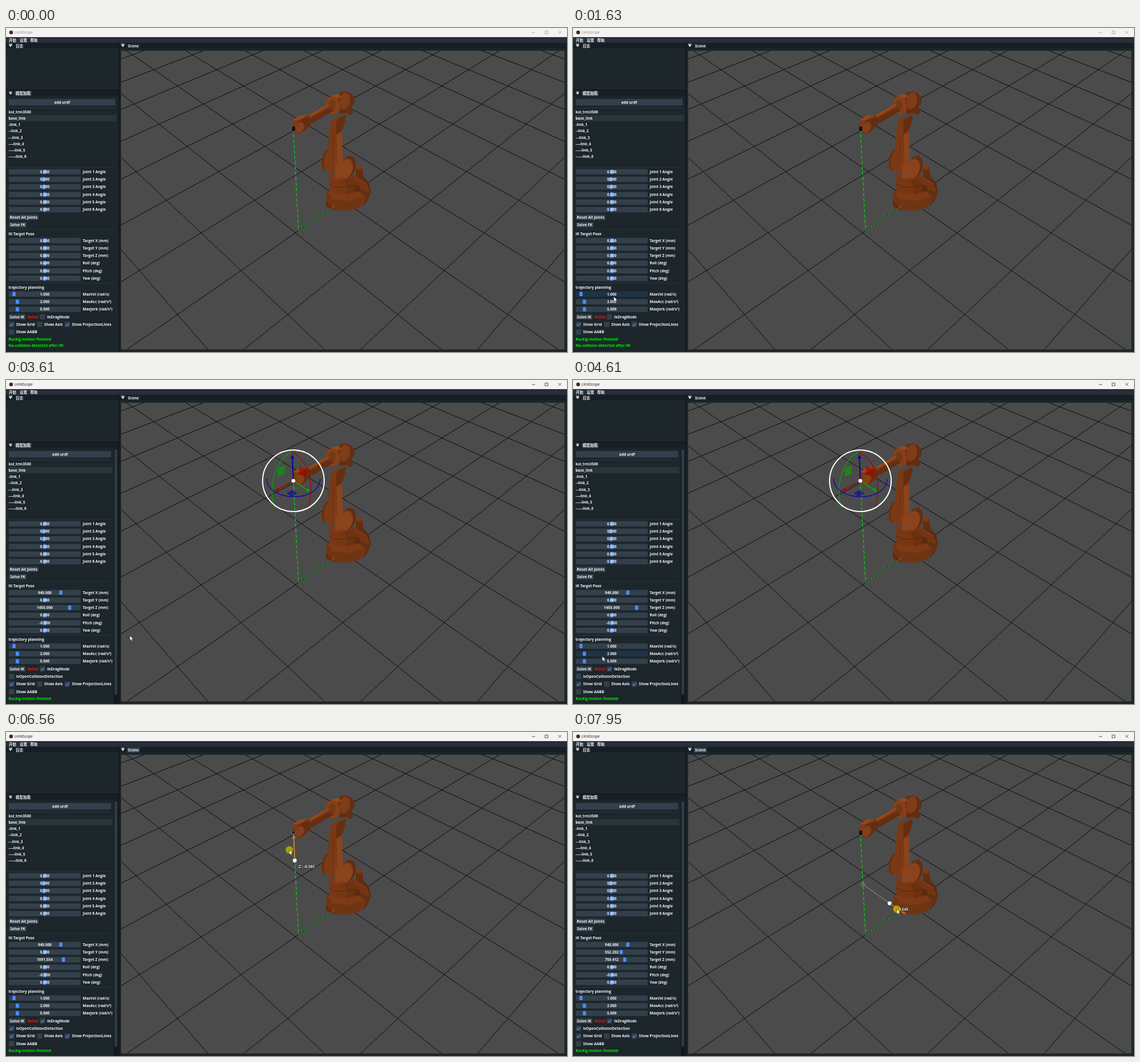
An HTML page for the animation above (8 s loop, 984 by 569 pixels).

```html
<!DOCTYPE html>
<html lang="zh">
<head>
<meta charset="utf-8">
<title>LimbScope</title>
<style>
html, body { margin: 0; width: 100%; height: 100%; overflow: hidden; background: #1c262b; }
svg { display: block; width: 984px; height: 569px; }
text { font: 700 6.5px "Open Sans", "Noto Sans CJK SC", "Noto Sans CJK", sans-serif; fill: #f2f5fa; white-space: pre; }
.title text { font-weight: 400; font-size: 6.2px; fill: inherit; }
</style>
</head>
<body>
<svg viewBox="0 0 984 569">
  <defs><clipPath id="view"><rect x="202" y="40" width="777.5" height="524.5"/></clipPath></defs>
  <rect width="984" height="569" fill="#1c262b"/>
  <rect x="202" y="40" width="777.5" height="524.5" fill="#4b4b4b"/>
  <g clip-path="url(#view)" fill="none">
    <path id="grid" stroke="#0b0b0b" stroke-width="1"/>
    <path id="drop" stroke="#00e800" stroke-width="1.1" stroke-dasharray="6 3.4"/>
    <path id="floor" stroke="#00d800" stroke-width="1.1" stroke-dasharray="3 2.4"/>
  </g>
  <g id="robot">
    <g fill="#5c2a10">
      <polygon points="613,262 626,260 637,272 640,289 634,303 628,311 605,318 600,290"/>
      <polygon points="617,268 633,275 639,289 622,283" fill="#773715"/>
      <polygon points="622,283 639,289 632,302 618,296" fill="#662f12"/>
      <polygon points="562,289 572,283 612,286 632,297 629,309 618,316 598,321 572,319 561,311" fill="#6f3413"/>
      <polygon points="561,303 566,311 572,309 578,314 577,320 571,319 562,313"/>
      <polygon points="564,289 573,284 600,292 619,287 629,296 600,304 574,301" fill="#7c3a16"/>
      <ellipse cx="574" cy="314" rx="4" ry="4.5" fill="#7c3a16"/>
    </g>
    <g fill="#6a3112">
      <path d="M566 261 611 257 614 281Q604 291 590 292 576 292 567 285Z" fill="#773715"/>
      <path d="M594 266 612 262 614 281Q607 289 598 291Z"/>
      <path d="M567 274Q584 286 613 275" fill="none" stroke="#552509" stroke-width=".8"/>
      <ellipse cx="562" cy="232" rx="8" ry="19" transform="rotate(8 562 232)"/>
      <ellipse cx="566" cy="233" rx="8" ry="18" transform="rotate(8 566 233)" fill="#7c3a16"/>
      <polygon points="568,178 579,186 580,246 570,265 563,230" fill="#7a3815"/>
      <polygon points="579,186 589,181 591,226 588,266 577,264" fill="#8a431b"/>
      <path d="M579 186 580 240M574 189 573 224" stroke="#5c2a10" stroke-width=".7" fill="none"/>
    </g>
    <g fill="#632e11">
      <path d="M614 246V266L627 268 625 245Z"/>
      <ellipse cx="619.5" cy="244.5" rx="5.8" ry="4.5" fill="#7c3a16"/>
      <path d="M610 266 630 279" stroke="#713414" stroke-width="10" stroke-linecap="round"/>
      <path d="M612 262 632 274" stroke="#86411a" stroke-width="2"/>
      <ellipse cx="601" cy="244" rx="12" ry="20" transform="rotate(14 601 244)"/>
      <ellipse cx="597" cy="247" rx="11" ry="17.5" transform="rotate(14 597 247)" fill="#8a431b"/>
      <path d="M594 226 607 221 613 232 609 242Z" fill="#76371510"/>
    </g>
    <g fill="#632e11">
      <polygon points="571,161 596,151 594,166 588,182 579,187 568,178" fill="#7a3815"/>
      <polygon points="580,161 596,152 594,166 588,182 579,187"/>
      <path d="M586 113Q593 110 602 113 612 118 611 132L606 139 609 148 605 153 597 149 586 152 580 130Z"/>
      <ellipse cx="594" cy="128" rx="9.5" ry="15" transform="rotate(10 594 128)" fill="#7f3c17"/>
      <polygon points="561,126 570,119 582,121 586,143 577,153 566,149" fill="#85401a"/>
      <polygon points="570,119 580,116 589,120 582,123" fill="#94491f"/>
      <ellipse cx="571" cy="137" rx="7" ry="11" transform="rotate(12 571 137)" fill="#743614"/>
      <polygon points="531,153 566,133 573,146 538,167" fill="#7c3a16"/>
      <polygon points="533,159 569,139 573,146 538,167"/>
      <polygon points="531,153 566,133 567,136 533,156" fill="#94491f"/>
      <polygon points="503,162 514,154 529,152 537,158 535,169 521,183 510,186 504,177" fill="#7c3a16"/>
      <polygon points="512,164 530,156 537,160 535,169 521,183 512,185"/>
      <ellipse cx="516" cy="174" rx="6.5" ry="9.5" transform="rotate(15 516 174)" fill="#84401a"/>
      <polygon points="503,162 514,154 529,152 513,162" fill="#94491f"/>
      <ellipse cx="504.5" cy="177" rx="2.8" ry="4.2" fill="#101010"/>
    </g>
  </g>
  <g id="gizmo"></g>
  <g id="frame"></g>
  <g id="panel"></g>
  <g id="pointer"></g>
</svg>
<script>
const $ = id => document.getElementById(id);
const LOOP = 8000, STEP = 65.8, FIRST = 250;
const PRESS_BOX = 3020, DRAG_ON = 3085, COLLIDE_ON = 4985;
const Z_DOWN = 6100, Z_UP = 6890, Y_DOWN = 7436;
const FRAME = "#333f4a", HOVER = "#1f3347", GRAB = "#478fff", BG = "#1c262b", BAR = "#171f24";
const REACH = 0.94;

// [time, x, y] of the pointer tip
const POINTER = [
  [250, 908, 562], [580, 225, 472], [714, 225, 472], [974, 83, 444], [1240, 80, 447], [1579, 72, 469],
  [2290, 67, 505], [3420, 67, 505], [3880, 439, 366], [3960, 439, 366], [4200, 506, 247],
  [4593, 51, 485], [4790, 12, 513], [4856, 10, 518], [5050, 10, 518], [5514, 575, 208],
  [5660, 552, 197], [6040, 500, 157], [6100, 500, 157], [6567, 497, 207], [6830, 501, 249],
  [6960, 501, 249], [7350, 522, 278], [7436, 522, 278], [7949, 568, 311]
];
const HEIGHT = [[6100, 1455], [6567, 1091.398], [6830, 759.412]];
const SIDE = [[7436, 0], [7949, 552.633]];

function track(keys, t, i = 1) {
  if (t <= keys[0][0]) return keys[0][i];
  const n = keys.findIndex(k => k[0] > t);
  if (n < 0) return keys[keys.length - 1][i];
  const a = keys[n - 1], b = keys[n];
  return a[i] + (b[i] - a[i]) * (t - a[0]) / (b[0] - a[0]);
}

// Camera at (5, 5, 5) looking at the origin, z up
function project(x, y, z = 0) {
  const right = (y - x) * Math.SQRT1_2, away = -(x + y) * Math.SQRT1_2;
  const depth = 8.66 + away * 0.8165 - z * 0.5774;
  return [590.5 + 946 * right / depth, 302.5 - 1135 * (away * 0.5774 + z * 0.8165) / depth];
}
const pt = p => p.map(v => v.toFixed(2)).join(" ");
const segment = (a, b) => `M${pt(a)}L${pt(b)}`;

let lines = "";
for (let n = -10; n <= 10; n++) {
  const near = Math.min(12, 12 - n);
  lines += segment(project(n, -12), project(n, near)) + segment(project(-12, n), project(near, n));
}
$("grid").setAttribute("d", lines);
$("drop").setAttribute("d", segment(project(REACH, 0, 1.455), project(REACH, 0)));
$("floor").setAttribute("d", segment(project(REACH, 0), project(0, 0)));

const rect = (x, y, w, h, fill, r = 0) => `<rect x="${x}" y="${y}" width="${w}" height="${h}" fill="${fill}" rx="${r}"/>`;
const text = (s, x, cy, more = "") => `<text x="${x}" y="${cy + 2.3}" ${more}>${s}</text>`;
const centred = (s, x, cy) => text(s, x, cy, 'text-anchor="middle"');
const dot = (x, y, r, fill, more = "") => `<circle cx="${x}" cy="${y}" r="${r}" fill="${fill}" ${more}/>`;
const rule = (y, right) => rect(5, y, right - 5, 0.6, FRAME);
const button = (s, x, cy, w, h = 9.5) => rect(x, cy - h / 2, w, h, FRAME, 1) + centred(s, x + w / 2, cy);
const menuMark = (x, y) => `<path d="M${x - 3} ${y - 3.2}h6v.9h-6zM${x - 3} ${y - 1.4}h6l-3 3.8z" fill="#f2f5fa"/>`;
const inside = (c, x, cy, w) => c.x >= x && c.x <= x + w && Math.abs(c.y - cy) <= 4.75;

function slider(label, cy, value, grab, c) {
  return rect(5, cy - 4.75, 126, 9.5, inside(c, 5, cy, 126) ? HOVER : FRAME, 1) +
    rect(grab - 2.8, cy - 3.8, 5.6, 7.6, GRAB, 1) +
    centred(value, 68, cy) + text(label, 134.5, cy);
}
function checkbox(label, x, cy, on, c) {
  const tick = `<path d="M${x + 2} ${cy + 0.2}l2 2.2 3.8-4.6" fill="none" stroke="${GRAB}" stroke-width="1.3"/>`;
  return rect(x, cy - 4.75, 9.5, 9.5, inside(c, x, cy, 9.5) ? HOVER : FRAME, 1) + (on ? tick : "") + text(label, x + 12.8, cy);
}

function drawFrame(t) {
  const ink = t >= PRESS_BOX - 8 ? "#111" : "#8c8c8c", scene = t >= Z_DOWN - 60;
  return `<g class="title" fill="${ink}">` + rect(0, 0, 984, 16, "#f3f3f3") +
    dot(9, 7.8, 3.3, "#4a2424") + text("LimbScope", 15, 8) +
    `<path d="M922.5 8h5.5M945.5 5.2h5v5h-5zM969 5.2l5 5m0-5l-5 5" fill="none" stroke="${ink}" stroke-width=".7"/></g>` +
    rect(0, 16, 984, 10, "#262e38") +
    text("开始", 5, 21.2) + text("设置", 24, 21.2) + text("帮助", 42.5, 21.2) +
    rect(0, 26.5, 197, 9.5, BAR) + rect(15.5, 27, 16, 9, BG) + menuMark(8, 31) + text("日志", 17, 31.3) +
    rect(0, 108, 197, 2, "#14191f") + rect(0, 110, 197, 9.5, BAR) +
    rect(15.5, 110.3, 29.5, 9.2, scene ? BG : FRAME, 1) + menuMark(8, 114.6) + text("模型加载", 17, 114.8) +
    rect(197, 26, 2.5, 543, "#14191f") + rect(199.5, 26.5, 784.5, 9.5, BAR) +
    rect(212, 27, 23, 9, scene ? FRAME : BG, 1) + menuMark(205, 31) + text("Scene", 214, 31.3);
}

function drawPanel(t, c) {
  const drag = t >= DRAG_ON, right = drag ? 184.5 : 192;
  const height = drag ? track(HEIGHT, t) : 0, side = drag ? track(SIDE, t) : 0, reach = drag ? 940 : 0;
  let out = button("add urdf", 5, 130.3, right - 5, 11.5) + rule(139.8, right) +
    rect(3, 152.8, right - 1, 11.2, "#29343b") + text("kol_trm3500", 4.5, 147.2) + text("base_link", 4.5, 158.5);
  for (let n = 1; n <= 6; n++) out += text("-".repeat(n) + "link_" + n, 4.5, 158.5 + n * 11.25);
  out += rule(244, right);
  for (let n = 1; n <= 6; n++)
    out += slider(`Joint ${n} Angle`, 239.2 + n * 13.3, "0.000", n === 2 ? 65.8 : n === 3 ? 66.6 : 68, c);
  out += button("Reset All Joints", 5, 332.3, 52) + button("Solve FK", 5, 345.7, 31) + rule(353.6, right) +
    text("IK Target Pose", 4.5, 361.2);
  [["Target X (mm)", reach], ["Target Y (mm)", side], ["Target Z (mm)", height],
   ["Roll (deg)", 0], ["Pitch (deg)", 0], ["Yaw (deg)", 0]].forEach(([label, v], i) => {
    const sign = drag && i === 4 ? "-" : "";
    out += slider(label, 373.2 + i * 13.33, sign + v.toFixed(3), 68 + v * 0.03, c);
  });
  out += rule(447.8, right) + text("trajectory planning", 4.5, 455.2) +
    slider("MaxVel (rad/s)", 467.3, "1.000", 14, c) +
    slider("MaxAcc (rad/s²)", 480.7, "2.000", 20, c) +
    slider("MaxJerk (rad/s³)", 494, "5.000", 20, c) +
    button("Solve IK", 5, 507.3, 29) + text("failed", 38, 507.3, 'style="fill:#f01414"') +
    checkbox("IkDragMode", 59.3, 507.3, drag, c);
  const y = drag ? 534 : 520.6, green = 'style="fill:#00f000"';
  if (drag) out += checkbox("isOpenCollisionDetection", 5, 520.6, t >= COLLIDE_ON, c);
  out += checkbox("Show Grid", 5, y, true, c) + checkbox("Show Axis", 54.3, y, false, c) +
    checkbox("Show ProjectionLines", 102.8, y, true, c) + checkbox("Show AABB", 5, y + 13.3, false, c) +
    text("Ruckig motion finished", 4.5, y + 25.9, green);
  out += drag
    ? rect(189.3, 120, 6.5, 449, "#12181b") + rect(190.5, 121, 4.2, 432, FRAME, 2)
    : text("No-collision detected after IK!", 4.5, y + 37.2, green);
  return out;
}

function arrow(dx, dy, color) {
  const len = Math.hypot(dx, dy), ux = dx / len, uy = dy / len, bx = dx - ux * 7, by = dy - uy * 7;
  return `<path d="M${ux * 5} ${uy * 5}L${bx} ${by}" stroke="${color}" stroke-width="1.8"/>` +
    `<path d="M${dx} ${dy}L${bx - uy * 3.2} ${by + ux * 3.2} ${bx + uy * 3.2} ${by - ux * 3.2}Z" fill="${color}"/>`;
}
const TIP = { X: [-33, 18], Y: [29, 19], Z: [-2, -46] };
const RED = "#aa0000", GREEN = "#00aa00", BLUE = "#0000aa", PICKED = "#ff8010b0";

function drawGizmo(t) {
  if (t < DRAG_ON) return "";
  const at = project(REACH, track(SIDE, t) / 1000, track(HEIGHT, t) / 1000);
  const axis = t >= Y_DOWN ? "Y" : t >= Z_DOWN && t < Z_UP ? "Z" : "";
  const open = `<g transform="translate(${pt(at)})" fill="none">`, centre = dot(0, 0, 3.4, "#fff");
  if (axis) {
    const from = axis === "Y" ? project(REACH, 0, 0.7594) : project(REACH, 0, 1.455);
    const moved = axis === "Y" ? track(SIDE, t - 7) / 1000 : (track(HEIGHT, t) - 1455) / 1000;
    const label = `${axis} : ${moved.toFixed(3)}`;
    return `<path d="${segment(from, at)}" stroke="#aaaaaaaa" stroke-width="1.1"/>` +
      dot(...from, 3, "none", 'stroke="#aaaaaaaa" stroke-width="1"') +
      open + arrow(...TIP[axis], PICKED) + centre +
      text(label, 7.5, 11.8, 'style="fill:#000"') + text(label, 7, 11.3) + "</g>";
  }
  const hoverZ = t > 5980 && t < Z_DOWN, hoverY = t > 7280;
  const arc = (d, color) => `<path d="${d}" stroke="${color}" stroke-width="1.2"/>`;
  const plane = (d, color) => `<path d="${d}z" fill="${color}90" stroke="${color}" stroke-width=".6"/>`;
  return open + arc("M-6-50C24-46 40 10 25 47", RED) + arc("M-4-50C-30-40-46 14-33 46", GREEN) +
    arc("M-47-4C-46 37 45 40 47-3", BLUE) +
    dot(0, 0, 54, "none", 'stroke="#fff" stroke-width="2"') +
    arrow(...TIP.X, RED) + plane("M10-25l12 4v14l-11-4", RED) +
    arrow(...TIP.Y, hoverY ? PICKED : GREEN) + plane("M-27-22l11-4v14l-11 4", GREEN) +
    arrow(...TIP.Z, hoverZ ? PICKED : BLUE) + plane("M-11 22l9-5 8 5-9 5", BLUE) + centre + "</g>";
}

function drawPointer(t, c) {
  if (t < FIRST) return "";
  const held = [[PRESS_BOX - 8, DRAG_ON - 5], [4915, COLLIDE_ON], [Z_DOWN - 60, Z_UP], [Y_DOWN, LOOP]]
    .some(([a, b]) => t >= a && t < b);
  return (held ? dot(c.x, c.y, 6.5, "#c8b400c8") : "") +
    `<path transform="translate(${c.x} ${c.y})" d="M0 0V8.6L2 6.8 3.4 9.8 4.8 9.2 3.5 6.3H6.1Z" fill="#fff" stroke="#111" stroke-width=".5"/>`;
}

let shown;
function tick(now) {
  const clock = now % LOOP;
  const t = FIRST + STEP * Math.floor((clock - FIRST + 8 * (clock >= FIRST)) / STEP);
  if (t !== shown) {
    shown = t;
    const c = t < FIRST ? { x: -99, y: -99 } : { x: track(POINTER, t), y: track(POINTER, t, 2) };
    $("gizmo").innerHTML = drawGizmo(t);
    $("frame").innerHTML = drawFrame(t);
    $("panel").innerHTML = drawPanel(t, c);
    $("pointer").innerHTML = drawPointer(t, c);
  }
  requestAnimationFrame(tick);
}
const start = performance.now();
tick(0);
function loop() { tick = null; }
</script>
</body>
</html>
```
